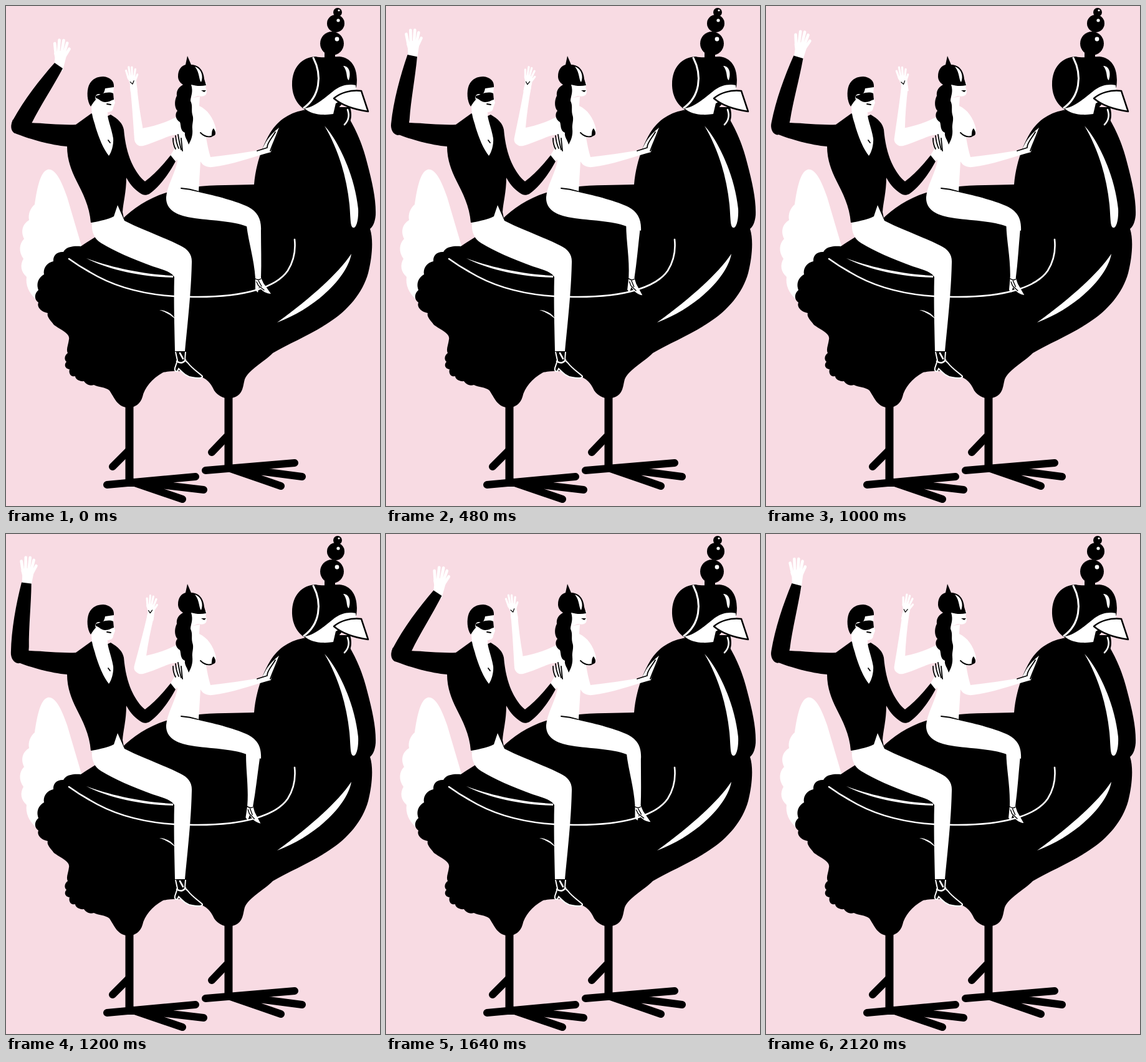
Recreate the animation shown at these times as an HTML page. Size 600 by 801 pixels, loop 2.16 s.

```html
<!DOCTYPE html>
<html lang="en">
<head>
<meta charset="utf-8">
<title>Riders</title>
<style>
html, body { margin: 0; width: 100%; height: 100%; overflow: hidden; background: #f8dbe3 }
svg { display: block; width: 100vw; height: 100vh }
.w { fill: #fff }
.line { fill: none; stroke: #000; stroke-width: 1.8; stroke-linecap: round; stroke-linejoin: round }
.shine { fill: none; stroke: #fff; stroke-width: 2.6; stroke-linecap: round }
.foot { fill: none; stroke: #000; stroke-width: 12; stroke-linecap: round }
.fingers { fill: none; stroke: #fff; stroke-width: 4.6; stroke-linecap: round }
</style>
</head>
<body>
<svg viewBox="0 0 600 801">
  <!-- bird -->
  <path class="w" d="M67 262C78 260 88 277 98 306L121 384L90 440L48 470C37 460 31 447 33 434C24 426 22 415 28 405C20 394 21 381 29 373C23 360 27 349 37 343C35 332 40 323 46 318C49 298 54 265 67 262Z"/>
  <path class="foot" d="M198 630V762M357 615V740" style="stroke-width:13"/>
  <path class="foot" d="M162 767L304 754M198 761L283 790M215 763L317 775M171 738L197 712M320 744L463 732M357 740L441 769M375 741L475 754M330 715L354 690"/>
  <path d="M120 385C142 370 165 358 186 342C212 316 250 295 300 290C335 286 370 287 398 286C400 258 410 226 424 203C437 182 456 170 482 166L545 172C557 188 572 220 579 250C587 280 594 310 593 335C592 347 588 354 584 357C590 375 587 405 581 428C572 460 548 488 518 507C488 527 455 540 428 556C412 572 390 582 383 598C380 608 381 622 366 627C354 631 342 627 334 616C328 603 322 597 308 592C290 583 268 584 252 587C234 597 222 612 219 626C215 640 203 645 192 643C178 640 174 628 166 616C159 610 148 611 141 607C133 610 127 604 125 601C117 602 111 597 111 593C104 595 100 588 102 582C94 581 93 574 97 570C92 565 95 559 99 556C96 550 100 543 101 534C103 525 90 520 77 511C71 503 65 498 67 492C56 490 49 482 52 475C45 470 45 461 52 455C48 445 52 435 61 430C59 420 66 411 76 409C75 399 83 393 92 394C96 386 107 384 120 385Z"/>
  <path class="w" d="M511 192C531 213 559 268 565 325C566 345 561 357 557 355C552 354 553 340 551 318C546 270 532 228 511 192Z"/>
  <path class="w" d="M554 397C548 434 497 484 435 507C480 474 529 434 554 397Z"/>
  <path class="shine" d="M101 405C112 413 123 420 134 426C180 454 240 467 308 466C385 466 434 450 452 424C462 408 465 392 463 374"/>
  <path class="w" d="M129 404C165 418 220 430 268 432V435C215 434 160 421 129 404ZM246 487Q264 488 271 501Q260 491 246 487Z"/>
  <path d="M459 128C458 98 475 82 497 81C510 84 522 81 535 81C557 83 566 104 562 130L526 172H495C473 168 460 150 459 128ZM511 72H528V88H511Z"/>
  <path d="M527 162L552 162C557 178 552 192 542 195C531 190 525 176 527 162Z"/>
  <path class="w" d="M479 164C493 163 508 150 523 138C538 125 552 125 561 127L562 138L529 156L525 173C506 176 488 173 479 164Z"/>
  <path class="shine" style="stroke-width:3" d="M493 83C508 112 503 145 478 163"/>
  <path class="shine" d="M548 166Q553 180 543 190"/>
  <path class="w" d="M541 96C550 96 554 106 550 119C545 116 549 106 541 96Z"/>
  <path class="w" d="M526 148C536 139 553 134 570 136L581 169C560 166 540 160 526 148Z" stroke="#000" stroke-width="2.5" stroke-linejoin="round"/>
  <circle cx="532" cy="10" r="7"/><circle cx="529" cy="28" r="14"/><circle cx="523" cy="60" r="19"/>
  <g class="w"><circle cx="534" cy="7" r="1.6"/><circle cx="533" cy="23" r="2.6"/><circle cx="531" cy="53" r="3.4"/></g>

  <!-- man -->
  <g id="manArm">
    <g id="manHand" class="w">
      <path d="M-7 8L-7 -12L-9 -20L-2 -24L9 -23L11 -15L7 8Z"/>
      <path class="fingers" d="M-6 -18L-9 -35M-2 -20L-2 -41M3 -20L5 -41M7 -20L11 -37M7 -12L15 -28"/>
    </g>
    <path d="M78 91L91 100C75 130 55 160 41 188L30 206L14 204C7 200 7 190 11 183C29 150 54 118 78 91Z"/>
  </g>
  <path d="M11 182L38 187C65 188 90 191 112 190L137 172L150 182L168 174C180 181 187 188 189 198C191 220 195 236 201 250C207 263 214 274 223 281C240 268 254 252 265 238L273 247C262 268 246 290 230 301C224 304 219 303 214 299C204 292 198 284 193 275C193 298 188 315 187 330L190 345L136 347C134 320 123 300 113 280C104 262 98 245 98 225C72 223 38 213 20 206C8 202 7 193 11 182Z"/>
  <path class="w" d="M138 347C152 344 164 342 173 337L179 319L190 344C215 357 250 369 280 384C292 390 299 398 298 412C297 460 291 510 287 553H271C270 510 269 470 270 434C264 425 250 422 235 417C203 405 174 393 153 380C140 372 137 360 138 347Z"/>
  <path class="w" d="M137 158L140 140L160 125L173 127L172 143L175 155L172 163C172 168 167 170 163 170C162 180 169 194 172 212C173 222 169 235 165 240C156 229 149 211 144 195C142 185 137 178 137 158Z"/>
  <path class="line" d="M164 215L167 219M162 157L168 158" stroke-width="1.4"/>
  <path d="M136 161C130 153 129 137 133 127C138 116 147 113 156 113C167 114 174 120 173 130L159 132C158 138 156 142 151 143L145 149C142 152 139 156 136 161Z"/>
  <path class="w" d="M144 150C141 143 148 138 153 143L149 154Z"/>
  <path d="M144 144L154 141C160 138 168 138 172 140L173 150C168 151 166 154 159 154C153 154 151 150 144 147Z"/>
  <path d="M272 554L275 568L271 580C270 584 272 586 275 585L277 581C284 588 290 594 299 595C309 597 316 596 315 593C307 586 298 580 292 572L287 567L288 554" stroke="#fff" stroke-width="2"/>
  <path class="shine" d="M274 569Q282 575 288 567M279 556L284 565" stroke-width="1.5"/>

  <!-- woman -->
  <g id="womanArm" class="w">
    <g id="womanHand">
      <path d="M-6 8L-5 -7L-8 -16L-3 -19L5 -17L6 -10L5 8Z"/>
      <path class="fingers" style="stroke-width:3.2" d="M-6 -14L-8 -27M-3 -16L-3 -32M0 -15L2 -31M3 -14L7 -27M4 -9L9 -18"/>
      <path class="line" style="stroke-width:1.2" d="M-4 -8L-1 -4L2 -9"/>
    </g>
    <path d="M199 128H210C212 150 215 172 219 193L221 217C215 226 207 222 206 214C204 185 202 155 199 128Z"/>
  </g>
  <g id="calf" class="w">
    <path d="M385 340C396 328 409 342 409 360C409 385 410 410 409 436H400C398 405 389 378 386 352Z"/>
    <path d="M400 435H409L413 444L425 461C418 461 411 457 406 450L404 459L400 455Z"/>
    <path class="line" style="stroke-width:1.4" d="M400 437Q405 440 409 437M402 442L405 448L414 455M405 440L410 449"/>
  </g>
  <path class="w" d="M218 196C236 193 256 187 273 178L284 150L311 145L310 160C323 166 332 178 337 197C337 204 330 210 321 211C323 222 325 232 328 242C355 239 384 235 411 230C416 219 421 208 438 195C438 206 429 215 425 234C398 241 365 254 331 258C322 259 315 255 312 249L309 298C337 304 371 313 389 322C404 330 410 342 409 360L386 353C363 344 328 344 297 339C272 335 256 325 257 306C259 286 271 270 275 248L275 206C262 206 239 219 220 224C207 226 205 215 209 206Z"/>
  <path class="line" d="M281 292Q295 293 308 297M312 203Q320 211 329 209M403 232L419 227M419 226C419 219 427 211 432 202M424 232C428 221 434 208 438 197"/>
  <path d="M329 210C331 205 329 200 333 196Q338 203 335 207Z"/>
  <path class="w" d="M297 122L322 124L320 130L322 136C322 144 317 146 308 144L297 148Z"/>
  <path d="M313 135L321 135L318 138Z"/>
  <path d="M276 113C276 102 281 96 288 94L291 80L297 94C309 94 317 103 318 117L321 127C313 129 304 128 297 126C301 138 296 145 296 152C300 160 297 166 299 174C302 182 298 189 299 197C300 207 297 215 293 222C291 214 286 210 287 203C279 200 281 190 279 186C271 181 271 172 275 168C269 161 271 149 274 144C273 134 278 130 284 126C279 123 276 118 276 113Z"/>
  <path class="w" d="M303 97C314 101 317 113 313 122C309 118 311 107 303 97Z"/>
  <path class="w" d="M264 239L270 229L268 215L272 220L271 208L277 222L276 207L281 224L283 237L272 249Z"/>
  <path class="line" d="M268 212Q268 222 272 229M272 208Q273 219 277 228M276 206Q278 219 281 230M281 212L283 232"/>
</svg>
<script>
const LOOP = 2160, SWING = 800, STEP = 40;
const el = id => document.getElementById(id);
const mod = (a, b) => ((a % b) + b) % b;

// Eased swing from a (at time ta) to b (at time tb) and back, every SWING ms.
function swing(t, ta, a, tb, b) {
  const p = mod(t - ta, SWING), d = tb - ta;
  const s = p < d ? p / d : 1 + (p - d) / (SWING - d);
  return a + (b - a) * (1 - Math.cos(Math.PI * s)) / 2;
}

const turn = (id, angle, x, y) =>
  el(id).setAttribute('transform', `rotate(${angle} ${x} ${y})`);
const place = (id, x, y, angle) =>
  el(id).setAttribute('transform', `translate(${x} ${y}) rotate(${angle})`);

function draw(now) {
  const t = Math.floor(now % LOOP / STEP) * STEP;
  const u = swing(t, 0, 0, 345, 1);
  const man = -28.4 * u, woman = 19.7 * u;
  turn('manArm', man, 24, 193);
  place('manHand', 84.5, 95.5, swing(t, 130, 8, 600, -3) - man);
  turn('womanArm', woman, 213, 212);
  place('womanHand', 204.5, 129, swing(t, 120, -13, 520, 9) - woman);
  turn('calf', 8.4 * u, 398, 345);
}

let start;
function tick(now) {
  start ??= now;
  draw(now - start);
  requestAnimationFrame(tick);
}
draw(0);
requestAnimationFrame(tick);
</script>
</body>
</html>
```
